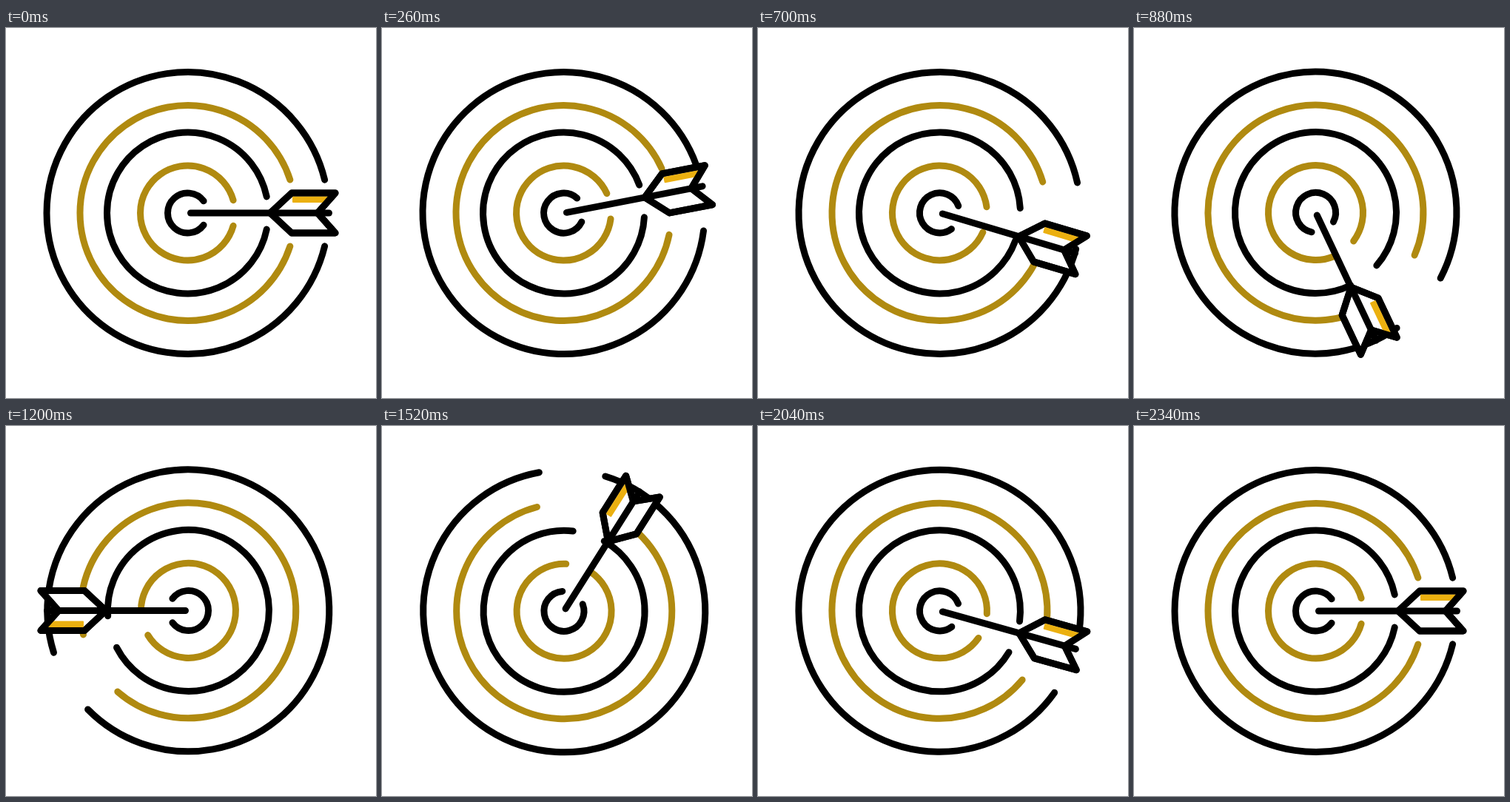
An HTML page that plays this animation: 500x500 px, repeating every 2400 ms.

```html
<!DOCTYPE html>
<html lang="en">
<head>
<meta charset="utf-8">
<title>Target</title>
<style>
  html, body { margin: 0; width: 100%; height: 100%; overflow: hidden; background: #fff; }
  svg { display: block; width: 100vw; height: 100vh; }
  path, line { fill: none; stroke: #000; stroke-width: 9; stroke-linecap: round; stroke-linejoin: round; }
  .gold { stroke: #b08a10; }
  .fin { fill: #fff; }
</style>
</head>
<body>
<svg viewBox="0 0 500 500">
  <g id="rings"></g>
  <g id="arrow">
    <path class="fin" stroke="none" d="M357 250L386 223H445L421 250L445 277H386Z"/>
    <rect x="387" y="227.5" width="48" height="8.5" rx="1" fill="#ebb010"/>
    <path d="M357 250L386 223H445L421 250L445 277H386Z"/>
    <line x1="249.5" y1="250" x2="436.5" y2="250"/>
  </g>
</svg>
<script>
const STEP = 20, LOOP = 2400, LAST = 117;
const CENTER = { x: 245.5, y: 250 };
const PIVOT = "246 249.75";

// radius, half gap in degrees, delay in steps, gold
const RINGS = [
  [190.5, 13.6, 4, false],
  [145.5, 18, 4, true],
  [109, 11.7, 2, false],
  [64, 15.7, 2, true],
  [27, 37, 0, false]
];

// start step, end step, start angle, end angle, x of both easing handles
const SWING = [
  [0, 21, 0, -16.2, 0.333, 0.667],
  [21, 95, -16.2, 383.6, 0.356, 0.733],
  [95, 113, 383.6, 360, 0.333, 0.667]
];

// Bezier easing with flat ends, solved by bisection
function ease(u, x1, x2) {
  let lo = 0, hi = 1;
  for (let i = 0; i < 24; i++) {
    const t = (lo + hi) / 2, s = 1 - t;
    const x = 3 * s * s * t * x1 + 3 * s * t * t * x2 + t * t * t;
    if (x < u) lo = t; else hi = t;
  }
  return lo * lo * (3 - 2 * lo);
}

function angleAt(step) {
  if (step <= 0) return 0;
  const part = SWING.find(p => step < p[1]);
  if (!part) return 360;
  const [start, end, from, to, x1, x2] = part;
  return from + (to - from) * ease((step - start) / (end - start), x1, x2);
}

function point(r, deg) {
  const a = deg * Math.PI / 180;
  return `${CENTER.x + r * Math.cos(a)} ${CENTER.y + r * Math.sin(a)}`;
}

function makeRing([r, gap, delay, gold]) {
  const el = document.createElementNS("http://www.w3.org/2000/svg", "path");
  el.setAttribute("d", `M${point(r, gap)}A${r} ${r} 0 1 1 ${point(r, -gap)}`);
  if (gold) el.setAttribute("class", "gold");
  document.getElementById("rings").append(el);
  return { el, delay };
}

const parts = RINGS.map(makeRing);
parts.push({ el: document.getElementById("arrow"), delay: 0 });

function draw(time) {
  const step = Math.min(LAST, Math.floor((time % LOOP) / STEP));
  for (const { el, delay } of parts) {
    el.setAttribute("transform", `rotate(${angleAt(step - delay)} ${PIVOT})`);
  }
}

const begin = performance.now();
function tick() {
  draw(Math.max(0, performance.now() - begin));
  requestAnimationFrame(tick);
}
tick();
</script>
</body>
</html>
```
